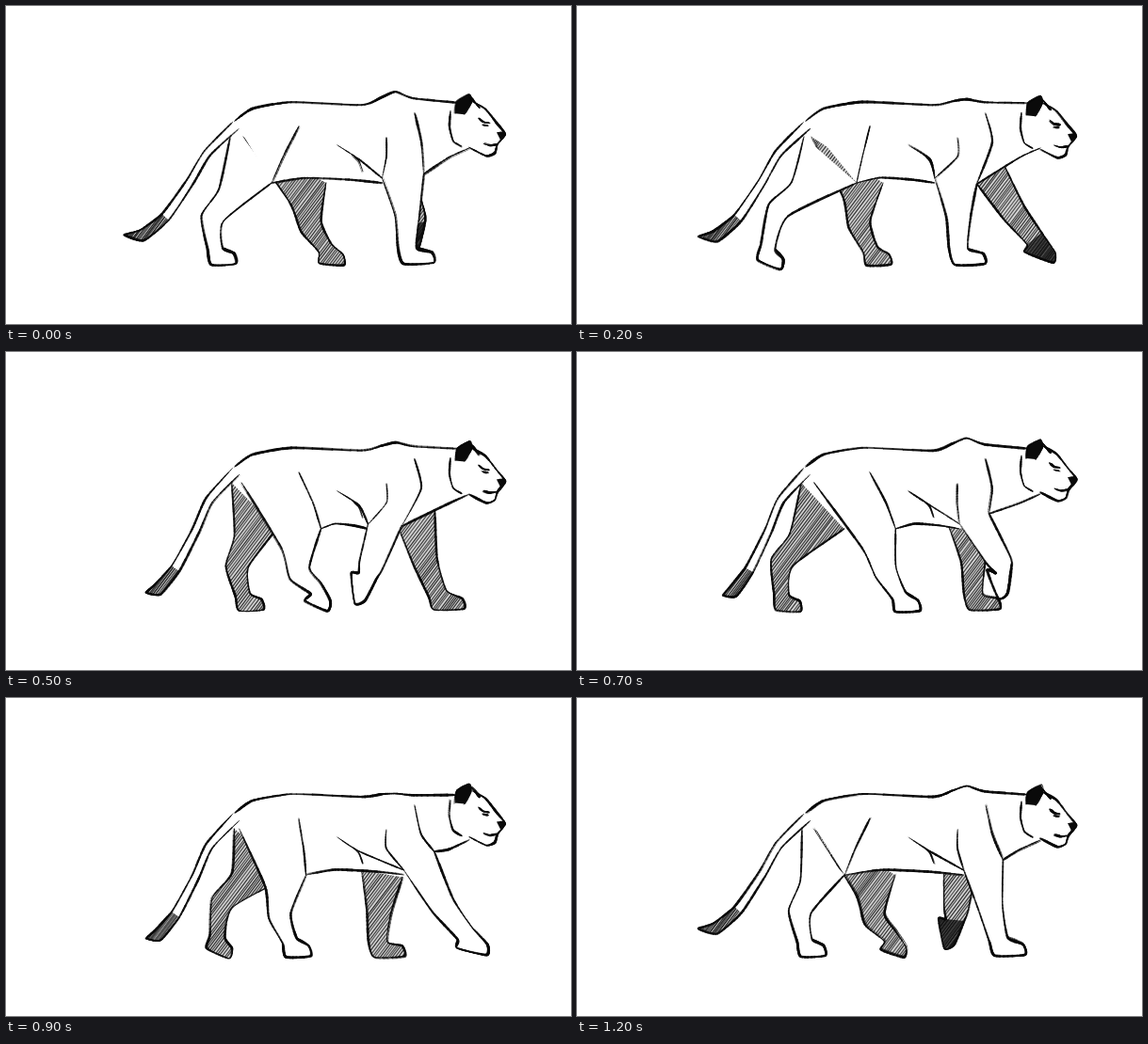
An HTML page with a canvas for the animation above (1.3 s loop, 600 by 338 pixels).

```html
<!DOCTYPE html>
<html lang="en">
<head>
<meta charset="utf-8">
<title>Walking big cat</title>
<style>
  html, body { margin: 0; width: 100%; height: 100%; overflow: hidden; background: #fff; }
  canvas { display: block; width: 600px; height: 338px; }
</style>
</head>
<body>
<canvas id="stage" width="600" height="338"></canvas>
<script>
const STEP = 100, STEPS = 13, INK = '#0a0a0a';
const ctx = document.getElementById('stage').getContext('2d');

// One stride of the lower joints: phase, hock or wrist, ankle, paw tilt.
// Near and far legs share it half a stride apart.
const HIND = {
  paw: 22, joint: 12, ankle: 8,
  stride: [
    [0, 219, 226, 222, 258, 0], [2, 214, 217, 203, 256, 25], [3.5, 262, 218, 268, 246, 30],
    [5, 312, 235, 329, 251, 27], [7, 328, 234, 342, 259, 0], [10, 272, 230, 281, 258, 0]
  ]
};
const FRONT = {
  paw: 28, joint: 13, ankle: 10,
  stride: [
    [0, 426, 222, 426, 257, 0], [2, 405, 224, 405, 258, 0], [3.5, 378, 234, 374, 259, 0],
    [5, 388, 226, 384, 238, 85], [7, 446, 218, 453, 230, 70], [8, 463, 217, 484, 244, 30],
    [10, 465, 224, 491, 257, 0]
  ]
};

const points = s => s.split(' ').map(p => p.split(',').map(Number));
const shift = (pts, dx, dy) => pts.map(([x, y]) => [x + dx, y + dy]);
const mix = (a, b, k) => a.map((v, i) => v + (b[i] - v) * k);
const wave = (phase, peak, beats = 1) => Math.cos(2 * Math.PI * beats * (phase - peak) / STEPS);
const unit = (a, b) => {
  const d = Math.hypot(b[0] - a[0], b[1] - a[1]) || 1;
  return [(b[0] - a[0]) / d, (b[1] - a[1]) / d];
};

// Two points either side of b on the bend a-b-c.
function sides(a, b, c, w) {
  const u = unit(a, b), v = unit(b, c), n = unit([0, 0], [-u[1] - v[1], u[0] + v[0]]);
  return [1, -1].map(s => [b[0] + n[0] * w * s, b[1] + n[1] * w * s]);
}

function joints(stride, phase) {
  const loop = [...stride, [STEPS, ...stride[0].slice(1)]];
  const i = loop.findIndex(k => k[0] > phase) - 1;
  const a = loop[i], b = loop[i + 1];
  const [, hx, hy, ax, ay, tilt] = mix(a, b, (phase - a[0]) / (b[0] - a[0]));
  return { hock: [hx, hy], ankle: [ax, ay], tilt: tilt * Math.PI / 180 };
}

function leg(kind, phase) {
  const { hock, ankle, tilt } = joints(kind.stride, phase);
  const hind = kind === HIND;
  const rear = hind ? [245 - 7 * wave(phase, 0), 139] : [400 + 24 * wave(phase, 9.7), 183];
  const front = hind ? [311 + 29 * wave(phase, 6.3), 188]
                     : [438 + 21 * wave(phase, 10.3), 177 - 14 * wave(phase, 9.5)];
  const top = mix(rear, front, 0.5);
  const [hockRear, hockFront] = sides(top, hock, ankle, kind.joint);
  const [ankleRear, ankleFront] = sides(hock, ankle, ankle, kind.ankle);
  const c = Math.cos(tilt), s = Math.sin(tilt);
  const sole = [[-4, 17], [kind.paw, 16], [kind.paw - 2, 5]]
    .map(([x, y]) => [ankle[0] + x * c - y * s, ankle[1] + x * s + y * c]);
  const up = unit(hock, top);
  const thigh = hind ? [[hockRear[0] + up[0] * 34, hockRear[1] + up[1] * 34]] : [];
  return {
    rear, front,
    outline: [rear, ...thigh, hockRear, ankleRear, ...sole, ankleFront, hockFront, front],
    foot: [ankleRear, ...sole, ankleFront],
    lifted: ankle[1] < 249
  };
}

function randomizer(seed) {
  return () => (seed = (seed * 1664525 + 1013904223) % 4294967296) / 4294967296;
}
let rand;

// Smooth line through the points, as short pieces.
function curve(pts, n = 9) {
  const end = pts.length - 1, out = [];
  for (let i = 0; i < end; i++) {
    const p = pts[Math.max(i - 1, 0)], q = pts[i], r = pts[i + 1], s = pts[Math.min(i + 2, end)];
    for (let t = 0; t < 0.999; t += 1 / n) {
      out.push(q.map((v, d) => {
        const a = 0.3 * (r[d] - p[d]), b = 0.3 * (s[d] - v), gap = r[d] - v;
        return v + t * (a + t * (3 * gap - 2 * a - b + t * (a + b - 2 * gap)));
      }));
    }
  }
  return [...out, pts[end]];
}

function trace(pts) {
  ctx.beginPath();
  curve(pts).forEach(p => ctx.lineTo(...p));
}

function fill(pts, color = '#fff') {
  trace(pts);
  ctx.fillStyle = color;
  ctx.fill();
}

// Pencil line: wavering pressure and a fainter second pass.
function pencil(pts, width = 2) {
  const line = curve(pts), last = line.length - 1;
  ctx.strokeStyle = INK;
  ctx.lineCap = 'round';
  for (const [size, alpha, off] of [[1, 0.95, 0], [0.6, 0.55, 2.4]]) {
    const phase = rand() * 6, dx = (rand() - 0.5) * off, dy = (rand() - 0.5) * off;
    ctx.globalAlpha = alpha;
    for (let i = 0; i < last; i++) {
      const taper = Math.min(1, 0.4 + Math.min(i, last - i) / 6);
      ctx.lineWidth = width * size * taper * (1 + 0.35 * Math.sin(phase + i * 0.23) + 0.3 * (rand() - 0.5));
      ctx.beginPath();
      ctx.moveTo(line[i][0] + dx, line[i][1] + dy);
      ctx.lineTo(line[i + 1][0] + dx, line[i + 1][1] + dy);
      ctx.stroke();
    }
  }
  ctx.globalAlpha = 1;
}

function hatch(pts, gap, width, alpha) {
  const xs = pts.map(p => p[0]), ys = pts.map(p => p[1]);
  const top = Math.min(...ys) - 5, bottom = Math.max(...ys) + 5, run = (bottom - top) * 0.75;
  ctx.save();
  trace(pts);
  ctx.clip();
  ctx.strokeStyle = INK;
  ctx.lineWidth = width;
  for (let x = Math.min(...xs) - 5; x < Math.max(...xs) + run; x += gap * (0.7 + rand() * 0.6)) {
    ctx.globalAlpha = alpha * (0.7 + rand() * 0.3);
    ctx.beginPath();
    ctx.moveTo(x, top);
    ctx.lineTo(x - run, bottom);
    ctx.stroke();
  }
  ctx.restore();
}

function farLeg({ outline, foot, lifted }, darkPaw) {
  fill(outline, '#d4d4d4');
  hatch(outline, 3, 1.3, 0.8);
  if (darkPaw && lifted) hatch(foot, 1.9, 1.9, 0.9);
  pencil(outline, 1.8);
}

function nearLeg({ outline, foot }) {
  fill(outline);
  pencil(outline);
  pencil(foot);
}

function drawTail(step) {
  const sway = wave(step, 0.5), widths = [5, 4, 4, 5, 6];
  const mid = points('244,127 215,157 199,189 176,228 155,249 140,251')
    .map(([x, y], i) => [x - 15 * sway * (i / 5) ** 1.5, y - 8 * sway * (i / 5) ** 1.5]);
  const edges = widths.map((w, i) => sides(mid[Math.max(i - 1, 0)], mid[i], mid[i + 1], w));
  const inner = edges.map(e => e[0]), outer = edges.map(e => e[1]), tip = mid[5];
  fill([...outer, tip, ...inner.reverse()]);
  const brush = [...outer.slice(3), tip, ...inner.slice(0, 2)];
  hatch(brush, 2.2, 1.6, 0.9);
  pencil([...outer, tip], 1.8);
  pencil([...inner].reverse().concat([tip]), 1.8);
  pencil(brush, 1.5);
}

function drawHead(step) {
  const dy = -2 + 2.5 * wave(step, 3);
  const at = s => shift(points(s), 0, dy);
  const lobe = at('477,116 479,103 492,96 494,104 487,117');
  pencil(at('495,103 509,111 521,126 530,138 522,149 519,158 510,161 492,152'), 2.1);
  pencil(at('472,113 471,130 475,145 484,151'), 1.8);
  fill(lobe, INK);
  pencil(lobe, 1.6);
  pencil(at('494,99 498,104 503,110'), 2.2);
  pencil(at('502,121 507,125 513,126'), 2.2);
  pencil(at('506,128 512,129'), 1.6);
  fill(at('521,136 529,135 531,139 525,144'), INK);
  pencil(at('507,148 514,150 521,149'), 1.9);
}

function draw(step) {
  const far = (step + STEPS / 2) % STEPS;
  const hind = leg(HIND, step), front = leg(FRONT, step);
  const lift = 6 * wave(step, 0, 2);
  const spine = points('243,122 262,109 303,102 378,105 399,100 414,97 433,101 482,103');
  for (const i of [4, 5, 6]) spine[i][1] -= lift * (i === 5 ? 1 : 0.5);
  const throat = [[492, 151], [470, 161], front.front];
  const sag = k => mix(hind.front, front.rear, k);
  const belly = [hind.front, ...shift([sag(0.3)], 0, -4), sag(0.7), shift([front.rear], 0, 5)[0]];

  rand = randomizer(step * 97 + 11);
  ctx.fillStyle = '#fff';
  ctx.fillRect(0, 0, 600, 338);

  farLeg(leg(HIND, far), false);
  farLeg(leg(FRONT, far), true);
  drawTail(step);
  fill([...spine, ...throat, ...belly.slice().reverse()]);
  pencil(belly);
  nearLeg(hind);
  nearLeg(front);
  pencil(spine, 2.1);
  pencil(spine.slice(0, 3), 1.5);
  pencil(throat);
  drawHead(step);

  // Flank, shoulder and ribs follow the legs.
  const [kx, ky] = hind.front, [ex, ey] = front.rear, [cx, cy] = front.front;
  pencil([[kx, ky], [kx * 0.6 + 125, 160], [311, 128]], 1.7);
  pencil([[cx, cy], [441, 145], [434, 114]], 1.8);
  pencil([[ex, ey], [404, 160], [404, 140]], 1.4);
  pencil([[352, 148], [375, 163], [ex, ey]], 1.6);
  pencil(points('368,158 375,165 379,176'), 1.2);
}

let shown = -1;
const start = performance.now();
function tick() {
  const step = Math.floor((performance.now() - start) / STEP) % STEPS;
  if (step !== shown) draw(shown = step);
  requestAnimationFrame(tick);
}
tick();
</script>
</body>
</html>
```
